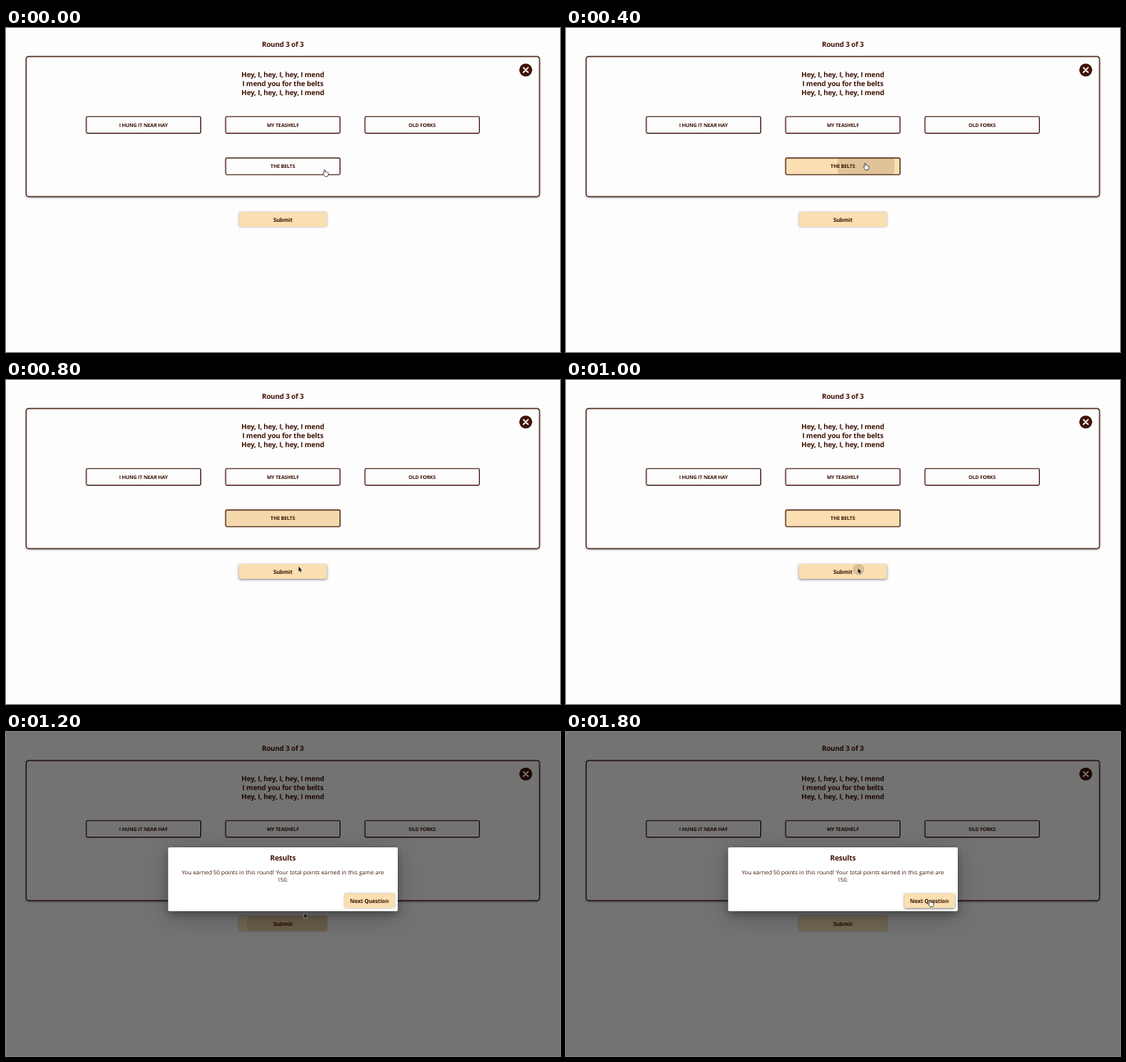
Animation of 676x396 px, one loop 2 s. Source, as an HTML page:

```html
<!DOCTYPE html>
<html lang="en">
<head>
<meta charset="utf-8">
<title>Lyric quiz</title>
<style>
  html, body { margin: 0; width: 100%; height: 100%; overflow: hidden; background: #fdfdfd; }
  svg { display: block; width: 676px; height: 396px; }
  text {
    font-family: "Open Sans", "Noto Sans", sans-serif;
    font-weight: 700;
    letter-spacing: -.018em;
    fill: #3f1206;
    text-anchor: middle;
    text-rendering: geometricPrecision;
  }
  .head { font-size: 8.6px; }
  .option { font-size: 6.1px; }
  .action { font-size: 6.75px; }
  .title { font-size: 8.9px; }
  .body text { font-size: 6.75px; font-weight: 400; letter-spacing: .087px; }
  .frame { fill: none; stroke: #3f1206; stroke-width: 1.15; }
  .panel { fill: #fdfdfd; filter: drop-shadow(0 1px .8px rgba(0, 0, 0, .3)); }
  .gold { fill: #f9dfb1; }
  .raised { filter: drop-shadow(0 .9px .8px rgba(0, 0, 0, .36)); }
  .raised.over { filter: drop-shadow(0 1.5px 1.6px rgba(0, 0, 0, .5)); }
  .dialog { fill: #fff; filter: drop-shadow(0 4px 5px rgba(0, 0, 0, .28)) drop-shadow(0 6px 14px rgba(0, 0, 0, .22)); }
  .ripple { fill: #3f1206; }
</style>
</head>
<body>
<svg viewBox="0 0 676 396">
  <defs>
    <clipPath id="choiceClip"><use href="#choice"/></clipPath>
    <clipPath id="submitClip"><use href="#submit"/></clipPath>
  </defs>

  <rect width="676" height="396" fill="#fdfdfd"/>
  <text class="head" x="337.7" y="22.8">Round 3 of 3</text>
  <rect class="frame panel" x="24.6" y="34.8" width="626.4" height="171.3" rx="3.5"/>
  <text class="head" x="337.8" y="60.1">Hey, I, hey, I, hey, I mend</text>
  <text class="head" x="337.8" y="70.9">I mend you for the belts</text>
  <text class="head" x="337.8" y="81.7">Hey, I, hey, I, hey, I mend</text>
  <circle cx="634.2" cy="51.3" r="7.9" fill="#3f1206"/>
  <path d="M631.4 48.5l5.6 5.6m0-5.6l-5.6 5.6" stroke="#fff" stroke-width="1.7" stroke-linecap="round"/>

  <rect id="choice" class="gold" x="268" y="158.8" width="139.6" height="20.4" rx="1.5"/>
  <circle id="choiceRipple" class="ripple" cx="366" cy="169" clip-path="url(#choiceClip)"/>
  <g id="options"></g>

  <rect id="submit" class="gold raised" x="284.1" y="225" width="107.5" height="18" rx="2"/>
  <circle id="submitRipple" class="ripple" cx="357" cy="231.5" clip-path="url(#submitClip)"/>
  <text class="action" x="337.8" y="236.5">Submit</text>

  <rect id="shade" width="676" height="396"/>
  <g id="dialog">
    <rect class="dialog" x="197.8" y="141" width="280.2" height="78" rx="1.8"/>
    <text class="title" x="337.8" y="157.2">Results</text>
    <g class="body">
      <text x="337.8" y="173.7">You earned 50 points in this round! Your total points earned in this game are</text>
      <text x="337.8" y="182.7">150.</text>
    </g>
    <rect id="next" class="gold raised" x="413" y="197.3" width="61.4" height="17.7" rx="2"/>
    <text class="action" x="443.4" y="208.7">Next Question</text>
  </g>

  <g id="pointer">
    <path id="hand" fill="#fff" stroke="#222" stroke-width=".7" stroke-linejoin="round"
      d="M-.8 .7Q0-.4 .8 .7V3Q1.6 2.5 2.3 3.2Q3.2 2.8 3.7 3.6Q4.8 3.4 4.7 4.8Q4.7 6.6 3.8 8.4H.3Q-.8 6.8-2 5.4Q-2.2 4.4-.8 5Z"/>
    <path id="arrow" fill="#111" stroke="#fff" stroke-width=".5" paint-order="stroke"
      d="M0 0V5.9L1.4 4.7L2.4 7L3.4 6.6L2.4 4.4H4.2Z"/>
  </g>
</svg>
<script>
const LOOP = 2000, STEP = 100, LAST = 1800;
const ids = ['choice', 'choiceRipple', 'submit', 'submitRipple', 'shade', 'dialog', 'next', 'pointer', 'hand', 'arrow'];
const el = Object.fromEntries(ids.map(id => [id, document.getElementById(id)]));

const labels = ['I HUNG IT NEAR HAY', 'MY TEASHELF', 'OLD FORKS', 'THE BELTS'];
document.getElementById('options').innerHTML = labels.map((label, i) => {
  const x = i < 3 ? 98 + 170 * i : 268;
  const y = i < 3 ? 108.2 : 158.8;
  return `<rect class="frame" x="${x}" y="${y}" width="139.6" height="20.4" rx="1.5"/>
    <text class="option" x="${x + 69.8}" y="${y + 12.4}">${label}</text>`;
}).join('');

// Pointer trips between its resting places.
const start = { x: 388.7, y: 173 };
const trips = [
  { from: 0, to: 200, x: 365, y: 165 },
  { from: 400, to: 600, x: 358.8, y: 221.8 },
  { from: 600, to: 900, x: 356.4, y: 230.2 },
  { from: 1100, to: 1200, x: 363.8, y: 221.6 },
  { from: 1200, to: 1700, x: 444, y: 205.2 }
];

const ramp = (t, from, to) => Math.min(1, Math.max(0, (t - from) / (to - from)));
const smooth = p => p * p * (3 - 2 * p);
const easeOut = p => 1 - (1 - p) ** 2;

function pointerAt(t) {
  return trips.reduce((p, trip) => {
    const k = smooth(ramp(t, trip.from, trip.to));
    return { x: p.x + (trip.x - p.x) * k, y: p.y + (trip.y - p.y) * k };
  }, start);
}

function inside(p, rect) {
  const { x, y, width, height } = rect.getBBox();
  return p.x > x && p.x < x + width && p.y > y && p.y < y + height;
}

// Grows at a steady speed and fades out over 600 ms.
function ripple(circle, age) {
  circle.setAttribute('r', age < 0 ? 0 : 7 + .28 * age);
  circle.style.opacity = .16 * (1 - ramp(age, 0, 600));
}

function draw(t) {
  const p = pointerAt(t);
  const overNext = inside(p, el.next);
  const isHand = overNext || inside(p, el.choice);
  el.pointer.setAttribute('transform', `translate(${p.x} ${p.y})`);
  el.hand.style.opacity = isHand ? 1 : 0;
  el.arrow.style.opacity = isHand ? 0 : 1;
  el.next.classList.toggle('over', overNext);
  el.submit.classList.toggle('over', inside(p, el.submit));

  el.choice.style.opacity = ramp(t, 0, 200);
  ripple(el.choiceRipple, t - 300);
  ripple(el.submitRipple, t - 1000);

  const fade = easeOut(ramp(t, 1030, 1200));
  el.shade.style.opacity = .545 * fade;
  el.dialog.style.opacity = fade;
}

const begin = performance.now();
function tick() {
  const t = (performance.now() - begin) % LOOP;
  draw(Math.min(LAST, Math.floor(t / STEP) * STEP));
  requestAnimationFrame(tick);
}
tick();
</script>
</body>
</html>
```
